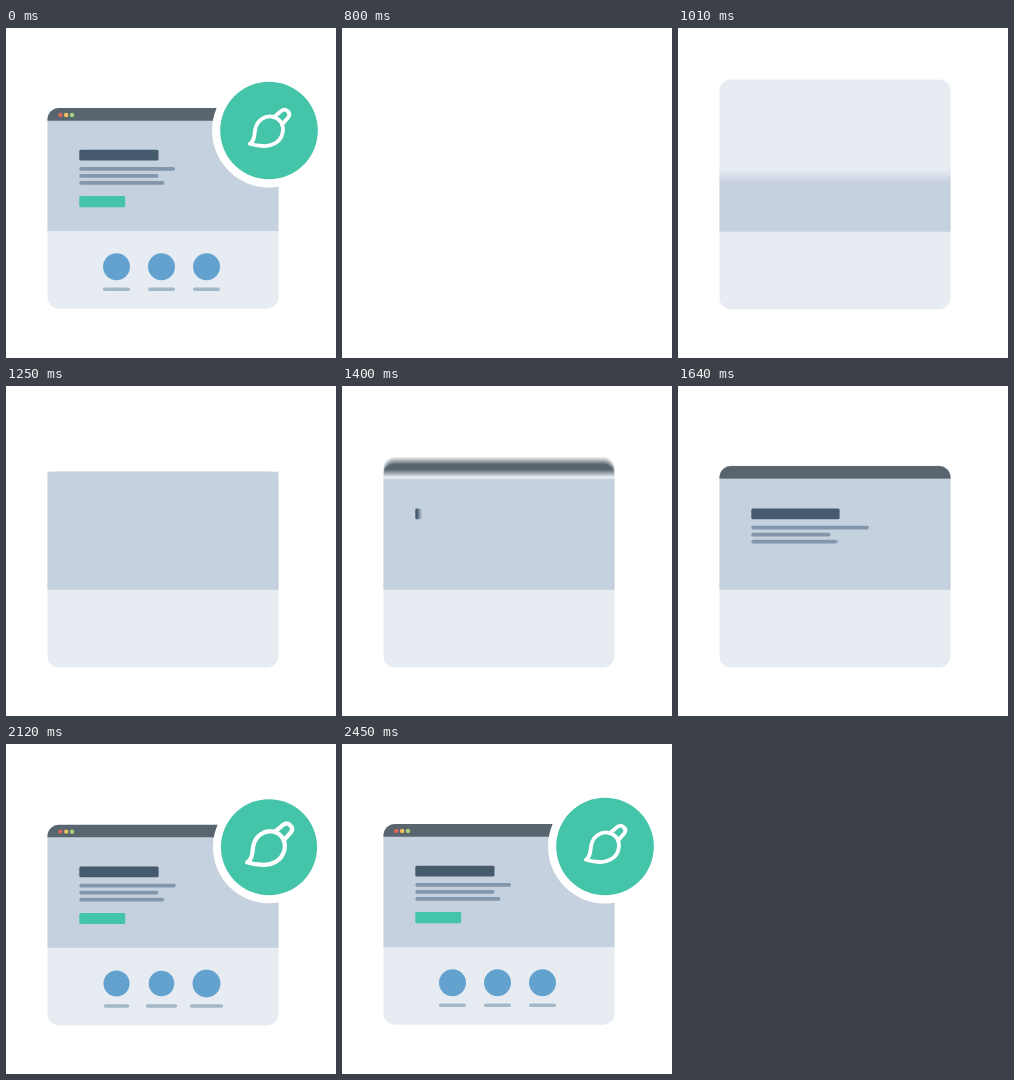
An HTML page with a canvas for the animation above (3020 ms loop, 330x330 px).

```html
<!DOCTYPE html>
<html lang="en">
<head>
<meta charset="utf-8">
<title>Web design</title>
<style>
  html, body { margin: 0; width: 100%; height: 100%; overflow: hidden; background: #fff; }
  canvas { display: block; width: 330px; height: 330px; }
</style>
</head>
<body>
<canvas id="stage"></canvas>
<script>
const SIZE = 330, LOOP = 3020, INTRO = 800, SETTLED = 2450, STEP = 30;
const SHUTTER = 14, SAMPLES = 8, REST = 1e5;
const FIRM = [8.9, 14.6], LOOSE = [7, 15], SLOW = [7.5, 12];

const ratio = window.devicePixelRatio || 1;
const stage = document.getElementById('stage');
const layer = document.createElement('canvas');
for (const canvas of [stage, layer]) canvas.width = canvas.height = Math.round(SIZE * ratio);
const out = stage.getContext('2d');
const ctx = layer.getContext('2d');

// Damped spring from 0 to 1, released at rest.
function spring(t, start, [decay, freq] = FIRM) {
  const s = (t - start) / 1000;
  if (s <= 0) return 0;
  return 1 - Math.exp(-decay * s) * (Math.cos(freq * s) + decay / freq * Math.sin(freq * s));
}

function easeOut(t, start, length) {
  const p = Math.min(1, Math.max(0, (t - start) / length));
  return 1 - (1 - p) ** 3;
}

function box(x, y, w, h, radius, color) {
  if (w <= 0 || h <= 0) return;
  ctx.fillStyle = color;
  ctx.beginPath();
  ctx.roundRect(x, y, w, h, radius);
  ctx.fill();
}

function disc(x, y, r, color) {
  if (r <= 0) return;
  ctx.fillStyle = color;
  ctx.beginPath();
  ctx.arc(x, y, r, 0, Math.PI * 2);
  ctx.fill();
}

const blob = new Path2D('M243.8 115.8 C249 112.5 248 107 249.3 101 C251 92.5 259 87 267 88.8 ' +
  'C275 91 278.5 98 276.3 106 C274 114.5 265 118.6 257 118 C252 117.8 247.5 117 243.8 115.8 Z');
const handle = new Path2D('M268 89 L275.5 82.8 Q278.8 80.4 281.5 83 Q284.8 86 282.4 89.2 L276 96.5');

function brush(scale) {
  if (scale <= 0) return;
  ctx.save();
  ctx.translate(263, 102.5);
  ctx.scale(scale, scale);
  ctx.translate(-263, -102.5);
  ctx.strokeStyle = '#fff';
  ctx.lineWidth = 3.8;
  ctx.lineJoin = ctx.lineCap = 'round';
  ctx.stroke(blob);
  ctx.stroke(handle);
  ctx.restore();
}

function drawPage(t) {
  const left = 41.5, width = 231;
  const cardHeight = 200.5 * spring(t, 802);
  box(left, 280.7 - cardHeight, width, cardHeight, 11.5, '#e7ecf3');

  const heroHeight = 113 * spring(t, 935);
  box(left, 203 - heroHeight, width, heroHeight, 0, '#c6d1df');

  const barTop = -18 + 98 * spring(t, 1267);
  box(left, barTop, width, 12.7, [11.5, 11.5, 0, 0], '#58656f');
}

function drawContent(t) {
  box(73.3, 121.8, 79.2 * spring(t, 1380), 10.8, 1.5, '#455a6d');
  box(73.3, 139, 95.7 * spring(t, 1430, LOOSE), 3.7, 1.8, '#8296ac');
  box(73.3, 146.1, 79.2 * easeOut(t, 1440, 200), 3.7, 1.8, '#8296ac');
  box(73.3, 153.1, 85 * spring(t, 1459, SLOW), 3.7, 1.8, '#8296ac');

  const buttonHeight = 11.2 * spring(t, 1640, LOOSE);
  box(73.3, 179.2 - buttonHeight, 45.9, buttonHeight, 1.5, '#44c4a9');

  ['#df6459', '#f0c561', '#a4d07a'].forEach((color, i) =>
    disc(54.4 + i * 5.8, 87, 2.2 * spring(t, [1640, 1690, 1790][i], LOOSE), color));

  for (let i = 0; i < 3; i++) {
    const x = 110.5 + i * 45;
    disc(x, 238.8, 13.5 * spring(t, [1640, 1688, 1795][i], LOOSE), '#63a2cf');
    const w = 27 * spring(t, [1718, 1855, 1905][i], LOOSE);
    box(x - w / 2, 259.5, w, 3.6, 1.8, '#a2b7c8');
  }
}

function drawBadge(t) {
  const scale = spring(t, 1640);
  disc(263, 102.5, 57 * scale, '#fff');
  disc(263, 102.5, 48.8 * scale, '#44c4a9');
  brush(spring(t, 1880));
}

function drawScene(t) {
  const resting = t === REST;
  ctx.setTransform(ratio, 0, 0, ratio, 0, 0);
  ctx.fillStyle = '#fff';
  ctx.fillRect(0, 0, SIZE, SIZE);
  ctx.translate(0, resting ? 0 : 0.7);
  drawPage(t);
  drawContent(t);
  drawBadge(t);
}

// Averages several moments within the shutter for motion blur.
function expose(t) {
  const samples = t === REST ? 1 : SAMPLES;
  for (let i = 0; i < samples; i++) {
    drawScene(samples === 1 ? t : t + SHUTTER * ((i + 0.5) / samples - 0.5));
    out.globalAlpha = 1 / (i + 1);
    out.drawImage(layer, 0, 0);
  }
}

let shown = null;
function tick() {
  const phase = performance.now() % LOOP;
  const moving = phase >= INTRO && phase < SETTLED;
  const t = moving ? INTRO + Math.floor((phase - INTRO) / STEP) * STEP : REST;
  if (t !== shown) expose(shown = t);
  requestAnimationFrame(tick);
}
tick();
</script>
</body>
</html>
```
